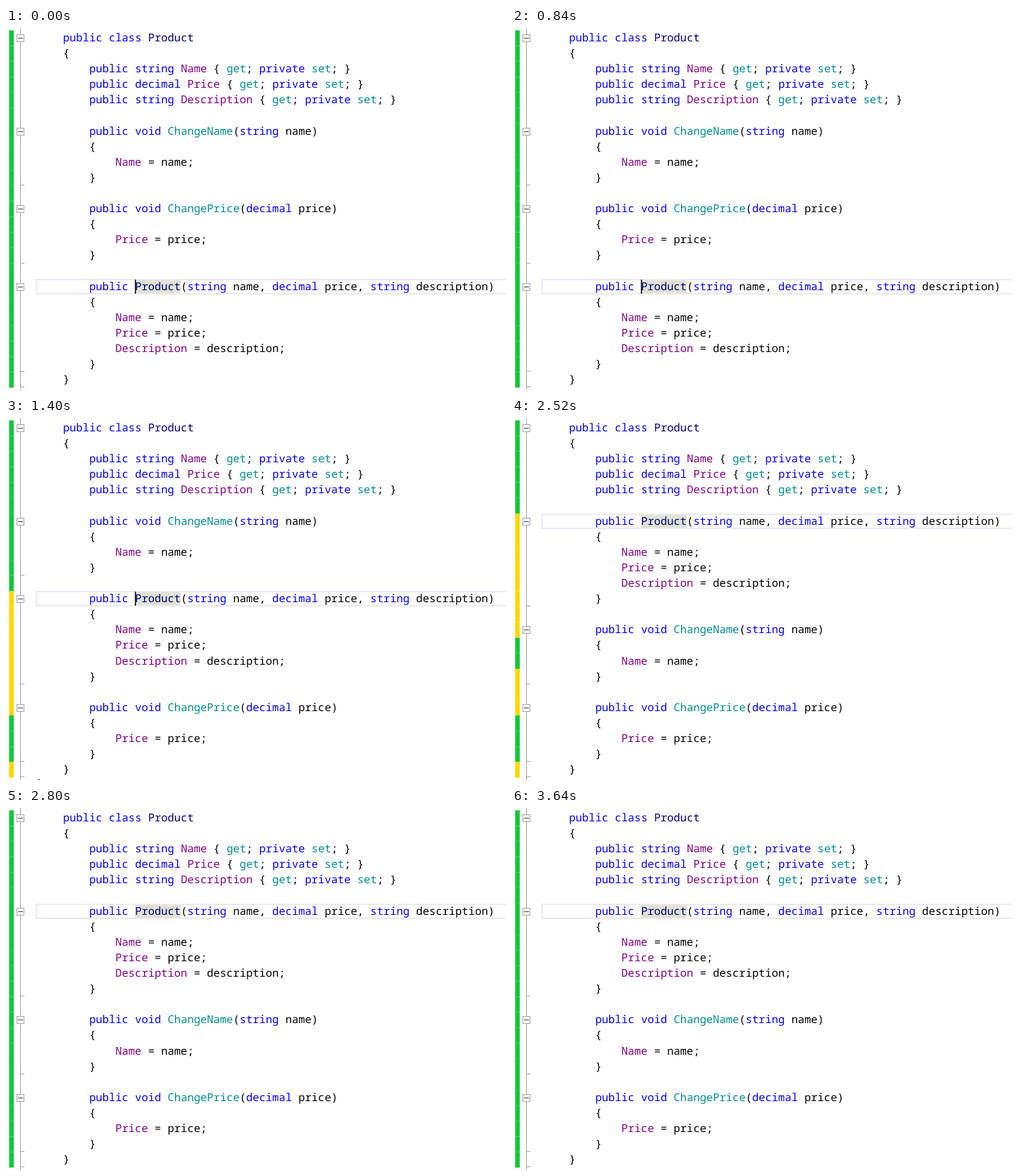
Write an HTML page that moves like this. It is 710 px wide and 515 px high and loops after 4.2 s.

```html
<!DOCTYPE html>
<html lang="en">
<head>
<meta charset="utf-8">
<title>Reordering class members</title>
<style>
  html, body { margin: 0; width: 100%; height: 100%; overflow: hidden; background: #fff; }
  svg { display: block; }
  text {
    font: 15.47px "Noto Sans Mono", "DejaVu Sans Mono", monospace;
    font-variant-ligatures: none;
    text-rendering: geometricPrecision;
    white-space: pre;
  }
  .keyword { fill: #0000ff; }
  .method { fill: #008b8b; }
  .type { fill: #00007c; }
  .property { fill: #800080; }
</style>
</head>
<body>
<svg id="editor" width="710" height="515" viewBox="0 0 710 515"></svg>
<script>
const CHAR = 9.282, PITCH = 22.1, LEFT = 81, LOOP = 4200;
const GREEN = '#15c63a', YELLOW = '#ffd800', GREY = '#a5a5a5';

const properties = [
  'public class Product', '{',
  '    public string Name { get; private set; }',
  '    public decimal Price { get; private set; }',
  '    public string Description { get; private set; }'
];
const method = (signature, ...body) => [
  '', `    public ${signature}`, '    {', ...body.map(line => '        ' + line), '    }'
];
const changeName = method('void ChangeName(string name)', 'Name = name;');
const changePrice = method('void ChangePrice(decimal price)', 'Price = price;');
const constructor = method('Product(string name, decimal price, string description)',
  'Name = name;', 'Price = price;', 'Description = description;');

// "edited" holds [first line, line after last] of unsaved changes.
const scenes = [
  { start: 0, members: [changeName, changePrice, constructor], edited: [], caret: true },
  { start: 1400, members: [changeName, constructor, changePrice],
    edited: [[11, 19], [22, 23]], caret: true, nextBrace: true },
  { start: 2100, members: [constructor, changeName, changePrice],
    edited: [[6, 14], [16, 19], [22, 23]] },
  { start: 2800, members: [constructor, changeName, changePrice], edited: [] }
];

const tokenClasses = [
  ['keyword', /^(public|private|class|string|decimal|void)$/],
  ['method', /^(get|set|Change\w+)$/],
  ['type', /^Product$/],
  ['property', /^(Name|Price|Description)$/]
];
const highlight = line => line.replace(/\w+/g, word => {
  const match = tokenClasses.find(([, pattern]) => pattern.test(word));
  return match ? `<tspan class="${match[0]}">${word}</tspan>` : word;
});

const rowTop = row => Math.round(3 + row * PITCH);
const rect = (x, y, w, h, fill, extra = '') =>
  `<rect x="${x}" y="${y}" width="${w}" height="${h}" fill="${fill}" ${extra}/>`;
const text = (x, row, content) => `<text x="${x}" y="${rowTop(row) + 16}">${content}</text>`;
// Fractional edges leave a faint seam between rows.
const marginBar = (row, fill) => rect(4.4, 3.3 + row * PITCH, 6.6, PITCH, fill);
const foldBox = row => {
  const y = rowTop(row) + 6;
  return rect(15.5, y + .5, 10, 10, '#fff', `stroke="${GREY}"`) + rect(17, y + 5, 7, 1, '#444');
};
const foldEnd = row => rect(20, rowTop(row + 1) - 1, 6, 1, GREY);

function drawScene({ members, edited, caret, nextBrace }) {
  const lines = [...properties, ...members.flat(), '}'];
  const isEdited = row => edited.some(([from, to]) => row >= from && row < to);
  const currentTop = rowTop(lines.findIndex(line => line.includes('Product(')));

  let svg = rect(20, 0, 1, 515, GREY);
  svg += rect(43, currentTop + 1, 680, 20, 'none', 'stroke="#eaeaf2" stroke-width="2"');
  svg += rect(183, currentTop + 2, 65, 18, '#dfe3d3');
  lines.forEach((line, row) => {
    svg += marginBar(row, isEdited(row) ? YELLOW : GREEN);
    if (/public (class|void|Product)/.test(line)) svg += foldBox(row);
    if (/^( {4})?}$/.test(line)) svg += foldEnd(row);
    svg += text(LEFT, row, highlight(line));
  });
  if (nextBrace) svg += text(LEFT - 4 * CHAR, lines.length - .1, '}');
  if (caret) svg += rect(183, currentTop + 1, 1.5, 20, '#000');
  return svg;
}

const editor = document.getElementById('editor');
let shown;
function tick() {
  const time = performance.now() % LOOP;
  const scene = scenes.findLast(({ start }) => start <= time);
  if (scene !== shown) editor.innerHTML = drawScene(shown = scene);
  requestAnimationFrame(tick);
}
tick();
</script>
</body>
</html>
```
